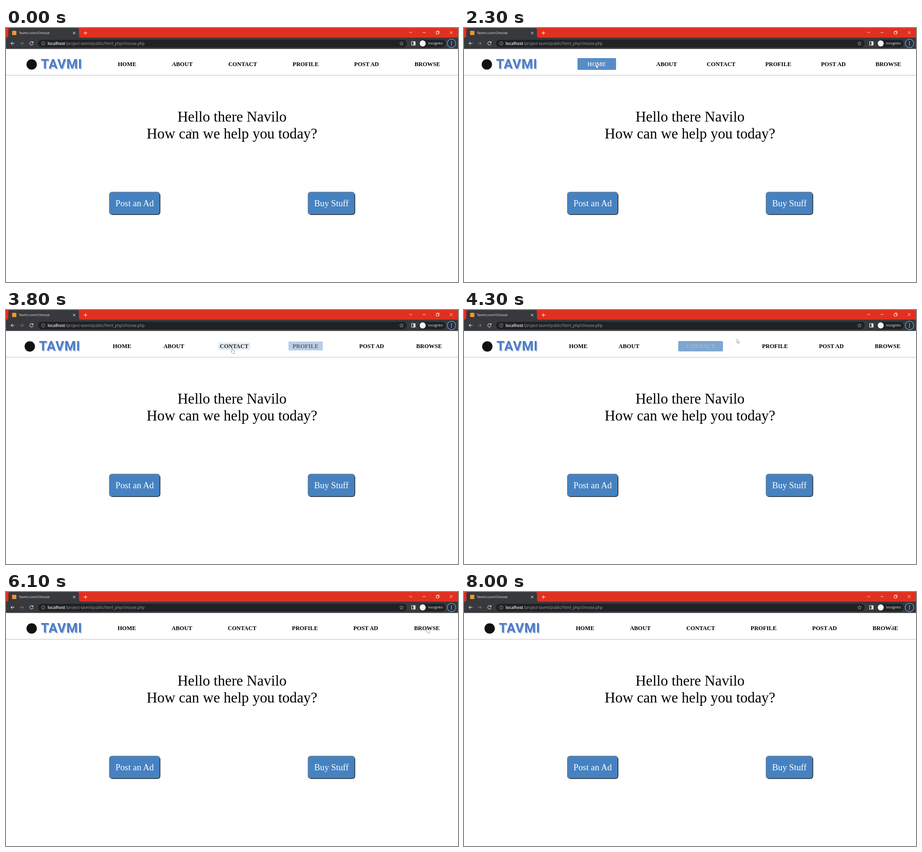
An HTML page that plays this animation: 960x540 px, repeating every 8.48 s.

```html
<!DOCTYPE html>
<html lang="en">
<head>
<meta charset="utf-8">
<title>Choose</title>
<style>
  html, body { margin: 0; width: 100%; height: 100%; overflow: hidden; background: #fff; }
  svg, nav { position: absolute; left: 0; }
  svg { top: 0; }
  nav {
    top: 44.5px; width: 960px; height: 64.5px;
    display: flex; justify-content: space-around; align-items: center;
    font: bold 12.4px/14px "Liberation Serif", serif; white-space: nowrap;
  }
  nav a { border-radius: 2px; }
  .logo { width: 124px; height: 32px; position: relative; flex: none; }
  .logo svg { overflow: visible; }
  .logo text { font: bold 28px Roboto, sans-serif; letter-spacing: .7px; }
  .ui { font-family: "Open Sans", sans-serif; }
  .serif { font-family: "Liberation Serif", serif; text-anchor: middle; }
  .line { fill: none; stroke: #fff; }
  .dim { fill: none; stroke: #aaa; stroke-width: .8; }
</style>
</head>
<body>
<nav>
  <div class="logo">
    <svg width="124" height="32">
      <circle cx="16.5" cy="16.5" r="11" fill="#111"/>
      <text x="37.5" y="26.5" fill="#b3c6e8">TAVMI</text>
      <text x="36" y="25" fill="#4d7cc5">TAVMI</text>
    </svg>
  </div>
  <a>HOME</a><a>ABOUT</a><a>CONTACT</a><a>PROFILE</a><a>POST AD</a><a>BROWSE</a>
</nav>

<svg width="960" height="540" viewBox="0 0 960 540">
  <!-- browser window -->
  <rect width="960" height="21" fill="#e03020"/>
  <path d="M0 21q5 0 5-5V4q0-4 4-4H151q4 0 4 4V16q0 5 5 5z" fill="#38393d"/>
  <rect y="20.5" width="960" height="24" fill="#38393d"/>
  <rect x="13" y="6" width="9" height="9" rx="1" fill="#f0952f"/>
  <text class="ui" x="27.3" y="13.2" font-size="7.4" fill="#e6e7e9">Tavmi.com/Choose</text>
  <g class="line">
    <path d="M142.3 8.2l5 5m0-5l-5 5M165 10.7h7.6m-3.8-3.8v7.6"/>
    <path d="M856.5 8l3 3 3-3M885 9.7h6M942.5 6.7l6 6m0-6l-6 6M913.5 8h5v5h-5zM915 8V6.5h5v5h-1.5" stroke-width=".85"/>
    <path d="M18 32.7h-7.5m3.5-3.5l-3.5 3.5 3.5 3.5M57 30.5a3.6 3.6 0 1 0 .5 3.2m0-5.2v2.8h-2.8"/>
    <path d="M29.5 32.7h7.5m-3.5-3.5l3.5 3.5-3.5 3.5" stroke="#85868a"/>
    <rect x="861.5" y="29" width="7.5" height="7.5"/>
  </g>
  <rect x="68" y="25" width="783" height="16" rx="8" fill="#202124"/>
  <g class="dim">
    <circle cx="79" cy="32.8" r="3.7"/>
    <path d="M79 32.3v2.5m0-4.4v1"/>
    <path id="star"/>
  </g>
  <text class="ui" y="35.7" font-size="8.25" fill="#9da0a4"><tspan x="88.5" font-size="8.5" font-weight="600" fill="#f1f2f3">localhost</tspan><tspan x="126.7">/project-tavmi/public/html_php/choose.php</tspan></text>
  <rect x="865.5" y="29" width="3.5" height="7.5" fill="#fff"/>
  <rect x="877" y="25" width="57" height="16" rx="8" fill="#202124"/>
  <circle cx="885" cy="32.8" r="6.5" fill="#f3f4f5"/>
  <text class="ui" x="896.5" y="35.3" font-size="7.2" fill="#f1f2f3">Incognito</text>
  <circle cx="946.2" cy="32.8" r="9" fill="#27303d" stroke="#7fa6dc" stroke-width="1.2"/>
  <path d="M946.2 29.5v6.7" stroke="#fff" stroke-width="1.8" stroke-linecap="round" stroke-dasharray="0 3.3"/>

  <!-- page -->
  <rect y="100" width="960" height="1" fill="#bdbdbd"/>
  <g class="serif" font-size="31.15">
    <text x="480" y="199">Hello there Navilo</text>
    <text x="480" y="235">How can we help you today?</text>
  </g>
  <g id="buttons" class="serif" font-size="18.8"></g>

  <g id="cursor" fill="#fff" stroke="#666" stroke-width=".6">
    <path id="beam" d="M-2-5q2 0 2 1 0-1 2-1M0-4V4M-2 5q2 0 2-1 0 1 2 1" fill="none" stroke="#333"/>
    <path id="arrow" d="M0 0V8.5L2 6.7 3.3 9.8 4.6 9.2 3.3 6.2H6Z"/>
    <path id="hand" d="M0 0q1 0 1 1v3l3.2.8q1 .4.9 1.6L4.6 11H.2L-3 6.8q.7-1 2 .2V1q0-1 1-1z"/>
  </g>
</svg>

<script>
const LOOP = 8480, FRAME = 100, TRANSITION = 500, PADDING = 24, LIFT = 20;
const byId = id => document.getElementById(id);
const links = [...document.querySelectorAll('nav a')];

// Places where the pointer rests; those with a link hover it meanwhile.
const stops = [
  { from: 0, to: 1100, x: 393.5, y: 220.5 },
  { link: 'HOME', from: 1700, to: 2250, x: 252.5, y: 83 },
  { link: 'PROFILE', from: 2930, to: 3620, x: 630, y: 80 },
  { link: 'CONTACT', from: 3735, to: 4200, x: 480.5, y: 81.5 },
  { link: 'POST AD', from: 4490, to: 5250, x: 768, y: 74.5 },
  { link: 'BROWSE', from: 6080, to: 6110, x: 895, y: 76 },
  { link: 'BROWSE', from: 6550, to: 7500, x: 897, y: 77 },
  { from: 8000, to: LOOP, x: 906.5, y: 69.5 }
];

// cubic-bezier(.25, .1, .25, 1)
function ease(u) {
  if (u <= 0) return 0;
  if (u >= 1) return 1;
  const curve = (a, b, s) => 3 * a * s * (1 - s) ** 2 + 3 * b * s * s * (1 - s) + s ** 3;
  let low = 0, high = 1;
  for (let i = 0; i < 20; i++) {
    const mid = (low + high) / 2;
    if (curve(.25, .25, mid) < u) low = mid; else high = mid;
  }
  return curve(.1, 1, low);
}

// An interrupted transition runs back in proportionally less time.
function hoverAmount({ from, to }, t) {
  if (t < to) return ease((t - from) / TRANSITION);
  const peak = ease((to - from) / TRANSITION);
  return peak * (1 - ease((t - to) / (TRANSITION * peak)));
}

// Straight travel between stops, bowed upwards along the menu.
function pointerAt(t) {
  const next = stops.findIndex(stop => t < stop.to);
  const b = stops[next], a = stops[next - 1];
  if (t >= b.from) return { ...b, resting: true };
  const u = (t - a.to) / (b.from - a.to);
  const bow = Math.min(LIFT, Math.abs(b.x - a.x) / 15) * 4 * u * (1 - u);
  return { x: a.x + (b.x - a.x) * u, y: a.y + (b.y - a.y) * u - bow };
}

function styleLink(link, amount) {
  const side = PADDING * amount, grey = 255 * amount;
  link.style.padding = `${side / 4}px ${side}px`;
  link.style.margin = `0 ${side}px`;
  link.style.background = `rgba(70, 130, 193, ${amount})`;
  link.style.color = `rgb(${grey}, ${grey}, ${grey})`;
}

function button(x, width, label) {
  return `<rect x="${x}" y="348.8" width="${width}" height="47.8" rx="5.5" fill="#4682c1" stroke="#777"/>
    <path d="M${x + width} 354v37q0 5.600-5.600 5.600H${x + 5}" fill="none" stroke="#111" stroke-width="1.2"/>
    <text x="${x + width / 2}" y="379" fill="#fff">${label}</text>`;
}

function starPath(cx, cy, radius) {
  const points = Array.from({ length: 10 }, (_, i) => {
    const r = i % 2 ? radius * .45 : radius, angle = i * Math.PI / 5;
    return [cx + r * Math.sin(angle), cy - r * Math.cos(angle)];
  });
  return `M${points.join('L')}Z`;
}

function draw() {
  const t = Math.floor(performance.now() % LOOP / FRAME) * FRAME;
  for (const link of links) {
    const visits = stops.filter(stop => stop.link === link.textContent);
    styleLink(link, Math.max(0, ...visits.map(visit => hoverAmount(visit, t))));
  }
  const pointer = pointerAt(t);
  const shape = pointer.link ? 'hand' : pointer.y > 172 ? 'beam' : 'arrow';
  for (const id of ['beam', 'arrow', 'hand']) byId(id).style.display = id === shape ? '' : 'none';
  byId('cursor').setAttribute('transform', `translate(${pointer.x} ${pointer.y})`);
  requestAnimationFrame(draw);
}

byId('star').setAttribute('d', starPath(840, 33, 4.3));
byId('buttons').innerHTML = button(219.4, 107.6, 'Post an Ad') + button(641.4, 99.4, 'Buy Stuff');
draw();
</script>
</body>
</html>
```
